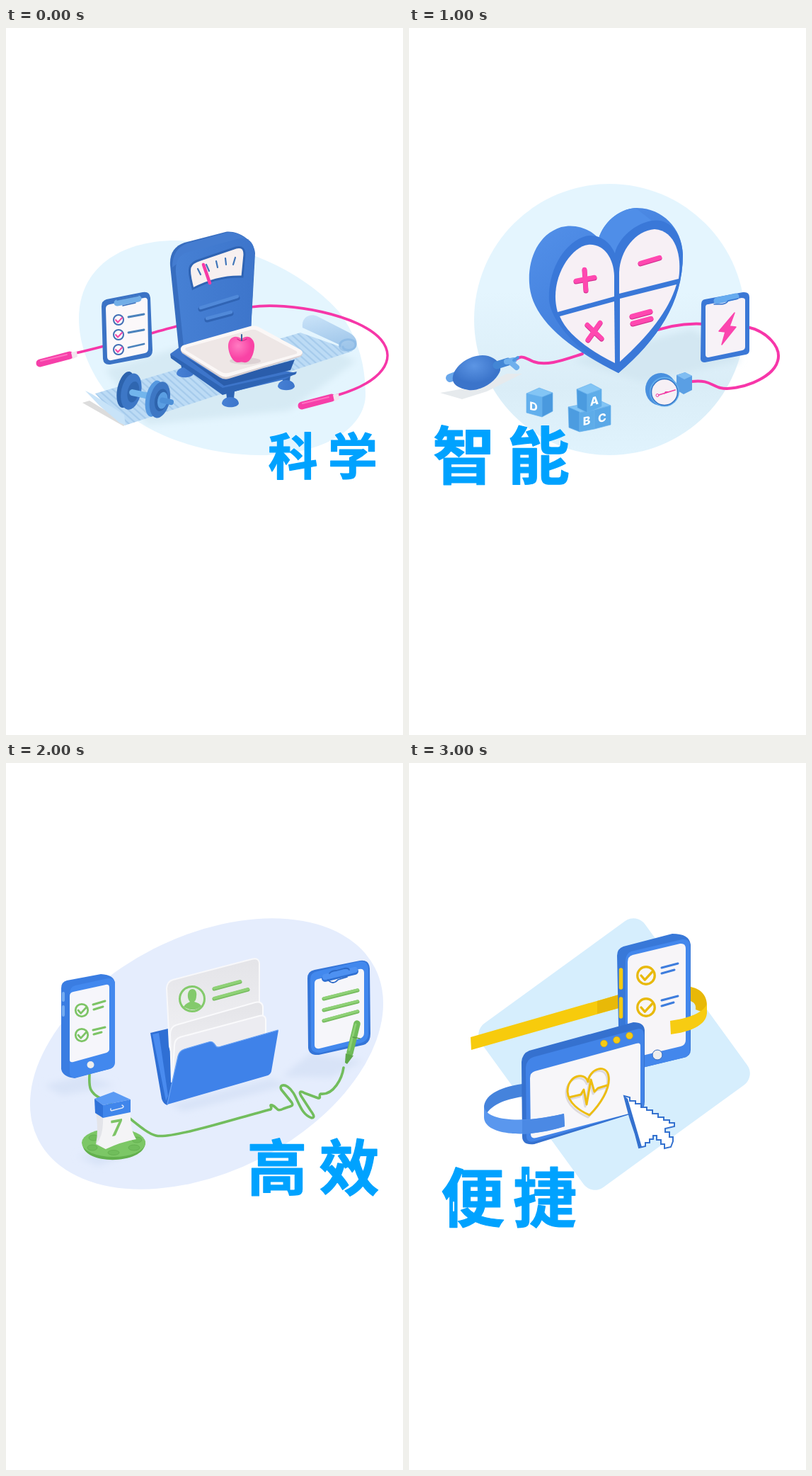
An HTML page for the animation above (4000 ms loop, 561 px wide and 998 px high).

```html
<!DOCTYPE html>
<html lang="zh-CN">
<head>
<meta charset="utf-8">
<title>科学 智能 高效 便捷</title>
<style>
html, body { margin: 0; width: 100%; height: 100%; overflow: hidden; background: #fff; }
svg { display: block; width: 100vw; height: 100vh; }
.scene { visibility: hidden; }
.line { fill: none; stroke-linecap: round; stroke-linejoin: round; }
.soft { filter: url(#blur); }
.word { font: 700 70px "Noto Sans CJK SC", "Noto Sans CJK", sans-serif; text-anchor: middle;
  fill: #00a2ff; stroke: #00a2ff; stroke-width: 1.2; stroke-linejoin: round; }
.glint { fill: none; stroke: #fff; stroke-width: 2; stroke-linecap: round; }
.abc { font: 800 16px Inter, "Open Sans", sans-serif; text-anchor: middle; fill: #fff; }
.ring { fill: none; stroke: var(--ring); stroke-width: var(--w, 2); }
.mark { fill: none; stroke: var(--mark); stroke-width: var(--w, 2); stroke-linecap: round; stroke-linejoin: round; }
</style>
</head>
<body>
<svg viewBox="0 0 561 998">
<defs>
  <filter id="blur" x="-30%" y="-60%" width="160%" height="220%"><feGaussianBlur stdDeviation="5"/></filter>
  <linearGradient id="blue"><stop stop-color="#4680d4"/><stop offset="1" stop-color="#3d75cb"/></linearGradient>
  <linearGradient id="side" x2=".7" y2="1"><stop stop-color="#5592ea"/><stop offset="1" stop-color="#3876d6"/></linearGradient>
  <linearGradient id="paper" x2="0" y2="1"><stop stop-color="#e4e4e8"/><stop offset="1" stop-color="#f4f4f7"/></linearGradient>
  <linearGradient id="floor" x2="0" y2="1"><stop offset=".4" stop-color="#e4f5fe"/><stop offset=".75" stop-color="#daedf7"/><stop offset="1" stop-color="#e0f3fd"/></linearGradient>
  <linearGradient id="roll" x2=".3" y2="1"><stop stop-color="#cbe4f9"/><stop offset="1" stop-color="#9fc6ea"/></linearGradient>
  <radialGradient id="apple" cx=".38" cy=".35"><stop stop-color="#ff7cc2"/><stop offset="1" stop-color="#f943a5"/></radialGradient>
  <radialGradient id="bulb" cx=".45" cy=".3"><stop stop-color="#5c95e4"/><stop offset="1" stop-color="#3b74ca"/></radialGradient>
  <pattern id="ribs" width="8" height="400" patternUnits="userSpaceOnUse" patternTransform="matrix(1 -.29 .9 .8 0 500)">
    <path d="M0 0H8V400H0Z" fill="#bcdbf5"/><path d="M0 0H2.500V400H0Z" fill="#a6cbec"/>
  </pattern>
  <g id="tick"><circle class="ring" r="7"/><path class="mark" d="M-4 0L-1 3.5L5 -3"/></g>
  <g id="foot"><path d="M-6 -14H6L5 -4H-5Z" fill="#2d64b4"/><path d="M-12 3C-11 -9 11 -9 12 3C10 10 -10 10 -12 3Z" fill="url(#blue)"/></g>
  <g id="handle"><path class="line" d="M0 0L42 -11" stroke="#f63fa9" stroke-width="11"/><path class="line" d="M1 -3L38 -12" stroke="#ff70c1" stroke-width="2"/><path d="M44 -15L52 -17L53 -9L46 -6Z" fill="#f2e6ee"/></g>
  <path id="pulse" class="line" stroke-width="3" d="M253 450C248 435 224 441 224 464C225 480 241 491 255 497C270 482 285 460 282 442C279 424 255 431 253 450M226 472L243 468L247 461L251 482L257 447L262 464L267 459L280 455"/>
</defs>

<g class="scene">
  <path d="M103 410C103 340 160 300 240 300C340 302 425 350 470 400C500 440 508 480 508 520C505 570 440 603 360 603C270 602 190 570 150 525C120 490 103 450 103 410Z" fill="#e4f5fe"/>
  <path class="soft" d="M140 482L240 452L430 440L495 470L400 540L200 560Z" fill="#d6eaf4"/>
  <path d="M108 529L118 526L170 558L166 562Z" fill="#dcdcdc"/>
  <path class="line" d="M98 459C150 447 200 432 245 420M345 394C400 386 500 405 530 440C553 468 532 500 466 519" stroke="#f637a8" stroke-width="3.600"/>
  <use href="#handle" x="48" y="473"/><use href="#handle" x="418" y="533"/>
  <path d="M126 516L416 430L490 456L168 561Z" fill="url(#ribs)"/>
  <path d="M112 512L122 517L167 546L169 561L160 557L132 533Z" fill="#c8e3f8"/>
  <path d="M419 423C417 408 430 402 440 407L485 430C498 437 499 450 488 455C478 459 468 455 471 447Z" fill="url(#roll)"/>
  <path class="line" d="M472 449C470 438 494 436 494 447C494 456 477 457 476 450" stroke="#8fbce6" stroke-width="3"/>

  <path d="M244 452L232 335C231 318 238 308 252 303L310 288C326 285 351 299 352 318L346 428L250 458Z" fill="#376dbf"/>
  <path d="M235 338C235 320 242 309 256 304L311 289C323 287 333 292 342 300L260 318Z" fill="#447cd0"/>
  <path d="M252 458L240 345C239 328 245 320 258 316L330 297C344 295 351 304 351 318L346 428Z" fill="url(#blue)"/>
  <path d="M264 368C261 355 258 345 260 338C262 332 268 329 275 327L325 310C334 308 337 312 337 320L334 351C311 350 287 356 264 368Z" fill="#f7f0f0" stroke="#2f64b4" stroke-width="3"/>
  <path class="line" d="M271 340L275 348M283 334L287 343M297 329L299 338M310 325L311 334M324 324L321 334" stroke="#4176b9" stroke-width="2.200"/>
  <path class="line" d="M279 334L288 360" stroke="#f63ba6" stroke-width="4.500"/>
  <path class="line" d="M275 397L327 381M284 412L318 403" stroke="#3064b4" stroke-width="7"/>
  <path class="line" d="M275 395L327 379M284 410L318 401" stroke="#5089d9" stroke-width="4.500"/>

  <use href="#foot" x="253" y="485"/><use href="#foot" x="317" y="527"/><use href="#foot" x="396" y="503"/>
  <path d="M232 460L246 450L310 470L411 487L394 496L306 517Z" fill="#3d75ca"/>
  <path d="M232 460L306 508L411 485L409 489L306 518L233 466Z" fill="#2e64b4"/>
  <path d="M250 462L306 496L408 468L402 483L308 505Z" fill="#2a5dab"/>
  <path d="M250 449L345 422Q351 420 357 423L416 455Q422 459 416 464L315 495Q308 497 302 493L249 459Q244 453 250 449Z" fill="#d9d1d3"/>
  <path d="M250 448L345 421Q351 419 357 422L416 454Q422 458 416 462L315 492Q308 494 302 490L249 457Q244 452 250 448Z" fill="#fbf7f6"/>
  <path d="M255 451L346 426Q351 425 355 427L410 456Q413 458 410 460L314 487Q309 488 305 486L254 455Q252 452 255 451Z" fill="#eee7e6"/>
  <ellipse cx="338" cy="470" rx="22" ry="5" fill="#ddd2d4"/>
  <path d="M333 439C342 431 352 439 351 450C350 463 344 474 336 472Q333 471 329 472C320 473 314 458 314 449C314 437 324 432 333 439Z" fill="url(#apple)"/>
  <path class="line" d="M327 439Q333 444 340 439" stroke="#d52e8b" stroke-width="1.500"/>
  <path class="line" d="M333 441V433" stroke="#365f9d" stroke-width="2"/>

  <path d="M142 383L193 373Q203 371 204 381L207 455Q207 463 200 465L147 475Q138 476 137 467L135 393Q135 385 142 383Z" fill="#3b73c5"/>
  <path d="M147 390L195 381Q199 380 200 384L201 452Q201 458 196 459L149 469Q143 470 143 464L141 396Q141 391 147 390Z" fill="#fbf8fa"/>
  <path class="line" d="M157 388L187 382" stroke="#72aee7" stroke-width="9"/>
  <path class="line" d="M157 384L187 378M165 392L183 388" stroke="#3a70be" stroke-width="1.500"/>
  <g style="--ring:#416fb5;--mark:#f349a8"><use href="#tick" x="159" y="412"/><use href="#tick" x="159" y="433"/><use href="#tick" x="159" y="454"/></g>
  <path class="line" d="M173 408L195 404M173 430L195 426M173 451L195 446" stroke="#4b83bd" stroke-width="2.800"/>

  <g transform="rotate(12 200 515)">
    <ellipse cx="169" cy="517" rx="12" ry="26" fill="#2d63ad"/><ellipse cx="177" cy="518" rx="14" ry="26" fill="#3d77c6"/>
    <ellipse cx="180" cy="518" rx="8" ry="15" fill="#2f66b0"/>
    <path class="line" d="M179 519H212" stroke="#72b5ec" stroke-width="9"/>
    <ellipse cx="211" cy="521" rx="12" ry="26" fill="#5598df"/><ellipse cx="219" cy="521" rx="14" ry="26" fill="#3d77c4"/>
    <ellipse cx="221" cy="521" rx="9" ry="16" fill="#2e64ad"/><ellipse cx="223" cy="521" rx="7" ry="12" fill="#5a9ee2"/>
    <path class="line" d="M223 521H235" stroke="#4d90d8" stroke-width="8"/>
  </g>
  <g class="word"><text x="405.500" y="631">科</text><text x="490" y="631">学</text></g>
</g>

<g class="scene">
  <circle cx="283.500" cy="411.500" r="191.500" fill="url(#floor)"/>
  <path class="soft" d="M230 470L400 425L470 470L330 500Z" fill="#d3e7f2"/>
  <path d="M44 515L105 504L138 488L160 488L110 513L75 524Z" fill="#e6eaed"/>
  <path class="line" d="M150 469C160 460 166 467 176 471C195 478 220 468 245 460M335 432C360 422 390 416 418 418M478 422C505 428 527 450 521 470C514 496 463 513 440 508C427 505 424 496 399 499" stroke="#f736a9" stroke-width="4"/>
  <path class="line" d="M58 494L66 491" stroke="#69a7eb" stroke-width="12"/>
  <path d="M62 492C65 475 90 458 112 463C126 467 132 478 128 486C121 501 100 513 84 511C68 508 60 502 62 492Z" fill="url(#bulb)"/>
  <path class="line" d="M124 476L140 471" stroke="#4386d5" stroke-width="11"/>
  <path class="line" d="M138 471L148 469M145 473L152 479" stroke="#70b0ed" stroke-width="8"/>
  <path class="line" d="M148 469L154 465" stroke="#5197e2" stroke-width="4"/>

  <path d="M268 297C255 283 235 276 215 281C180 292 168 330 170 360C172 400 205 442 296 487C350 440 387 390 387 320C386 280 355 253 320 254C295 256 275 275 268 297Z" fill="url(#side)"/>
  <path d="M268 297L292 320C295 303 315 277 343 272L320 254C295 256 275 275 268 297Z" fill="#4f8ee8"/>
  <path d="M291 318C282 297 262 289 246 295C213 308 196 350 198 385C201 412 234 456 296 487C352 440 387 385 387 320C385 285 365 268 343 272C313 278 294 302 291 318Z" fill="#3a78d8"/>
  <g fill="#f7f0f5">
    <path d="M290 379L210 401C197 356 228 309 253 306C275 304 289 324 290 350Z"/>
    <path d="M297 375L381 354C386 322 377 286 347 284C320 286 298 314 297 345Z"/>
    <path d="M213 407L290 386L291 473C255 455 224 433 213 407Z"/>
    <path d="M298 382L378 362C367 399 339 434 298 471Z"/>
  </g>
  <path class="line" d="M236 358L262 353M248 342L250 371M327 333L354 325M252 420L272 439M270 417L253 441M315 408L341 401M316 418L342 411" stroke="#d42f91" stroke-width="7"/>
  <path class="line" d="M236 357L262 352M248 341L250 370M327 332L354 324M252 419L272 438M270 416L253 440M315 407L341 400M316 417L342 410" stroke="#ff48b0" stroke-width="6.500"/>

  <path d="M418 383L472 373Q481 372 481 380V455Q481 460 476 461L418 472Q412 472 412 467L413 390Q413 384 418 383Z" fill="#3b78d6"/>
  <path d="M423 390L470 381Q475 381 475 384V450Q475 454 471 455L423 465Q419 465 419 461V394Q419 390 423 390Z" fill="#f7f2f7"/>
  <path class="line" d="M435 385L462 379" stroke="#66abef" stroke-width="9"/>
  <path class="line" d="M431 390H440Q448 390 451 385L465 382" stroke="#3976d0" stroke-width="1.500"/>
  <path d="M460 402L438 428L447 429L442 447L462 422L453 421Z" fill="#fb45ae" stroke="#fb45ae" stroke-width="1.500" stroke-linejoin="round"/>

  <path d="M378 490L390 486L400 491V511L388 517L378 511Z" fill="#5a9fe4"/><path d="M378 490L390 486L400 491L389 496Z" fill="#80bdf2"/>
  <ellipse cx="356" cy="510" rx="22" ry="23" fill="#4990df"/>
  <circle cx="361" cy="513.500" r="21" fill="#63acea"/><circle cx="361" cy="514" r="18.500" fill="#f6f0f5" stroke="#3574c6" stroke-width="1.500"/>
  <path class="line" d="M353 518L376 511" stroke="#f13ca5" stroke-width="1.800"/><path d="M360 517L362 513L369 513Z" fill="#f13ca5"/><circle cx="351" cy="518.500" r="2" fill="none" stroke="#f13ca5"/>

  <g stroke="#69b2ec" stroke-width=".7">
    <path d="M166 516L184 508L203 515L184 523Z" fill="#83c5f5"/><path d="M166 516L188 521V549L166 543Z" fill="#63b0ed"/><path d="M188 521L203 515V541L188 549Z" fill="#4a99de"/>
    <path d="M225 535L270 526L285 533L241 543Z" fill="#83c5f5"/><path d="M225 535L241 542V570L226 564Z" fill="#4c9ce0"/><path d="M241 543L262 539V566L241 570Z" fill="#5eace9"/><path d="M262 539L285 533V560L262 566Z" fill="#5aa8e7"/>
    <path d="M237 510L257 502L272 510L252 517Z" fill="#83c5f5"/><path d="M237 510L252 517V543L238 536Z" fill="#4b9bdf"/><path d="M252 517L272 510V534L252 543Z" fill="#5fade9"/>
  </g>
  <g class="abc"><text transform="translate(176 540) skewY(12)">D</text><text transform="translate(262 532) skewY(-15)">A</text><text transform="translate(251 560) skewY(-12)">B</text><text transform="translate(273 556) skewY(-12)">C</text></g>
  <g class="word" style="font-size:88px"><text x="77.500" y="636">智</text><text x="183" y="636">能</text></g>
</g>

<g class="scene">
  <ellipse cx="283.500" cy="410.500" rx="267" ry="166" transform="rotate(-27 283.500 410.500)" fill="#e5edfd"/>
  <g class="soft" fill="#d8e3f7"><path d="M54 455L110 440L154 455L80 469Z"/><path d="M232 482L375 445L398 455L250 492Z"/><path d="M390 443L430 410L505 420L460 444Z"/><path d="M100 554L190 546L130 569Z"/></g>
  <g class="line">
    <path d="M118 440C117 458 118 466 135 474C165 488 193 522 212 526C235 531 330 500 374 489C377 486 371 482 376 483C384 486 382 493 392 488C402 484 409 485 402 477L389 461C386 455 392 453 398 457C413 467 413 495 432 501C438 501 433 494 430 490L417 470C413 463 417 463 422 466L441 473C446 474 441 468 445 467C463 469 475 445 477 430" stroke="#72bd5d" stroke-width="3.600"/>
  </g>

  <path d="M78 318Q78 309 86 307L134 298Q154 299 154 312V422Q153 430 146 432L97 445Q80 443 78 432Z" fill="#3a7de2"/>
  <path d="M90 326Q90 316 98 314L144 304Q154 303 154 312V422Q154 430 146 432L98 444Q90 445 90 437Z" fill="#4288ee"/>
  <path d="M90 329Q90 324 95 323L141 313Q146 312 146 317V404Q146 407 142 409L95 422Q90 423 90 419Z" fill="#f6f6fb"/>
  <circle cx="119.500" cy="426" r="5" fill="#eee"/>
  <path class="line" d="M81 325V335M81 344V356" stroke="#75acf1" stroke-width="4"/>
  <g style="--ring:#7dc466;--mark:#7dc466;--w:2.200"><use href="#tick" transform="translate(107 349) scale(1.250)"/><use href="#tick" transform="translate(107 384) scale(1.250)"/></g>
  <path class="line" d="M123 341L140 336M124 348L137 344M123 377L140 373M124 383L135 380" stroke="#7dc466" stroke-width="3"/>

  <path d="M108 537C108 517 196 515 197 536C196 567 108 569 108 537Z" fill="#62b04d"/>
  <ellipse cx="152" cy="536" rx="45" ry="20" fill="#7cc766"/>
  <g fill="#70bd5b" stroke="#62ae4e" stroke-width=".8"><ellipse cx="124" cy="529" rx="7" ry="4"/><ellipse cx="122" cy="543" rx="7" ry="4"/><ellipse cx="152" cy="550" rx="8" ry="3.500"/><ellipse cx="181" cy="543" rx="8" ry="4"/><ellipse cx="185" cy="532" rx="7" ry="4"/></g>
  <path d="M127 492L138 500L141 545L127 538Q131 520 127 492Z" fill="#e3e4e9"/>
  <path d="M137 500L176 492Q175 518 184 531Q162 535 141 545Q133 541 128 537Q138 526 137 500Z" fill="#f4f4f6"/>
  <path d="M125 474L152 464L176 475L137 483Z" fill="#5a9af4"/><path d="M125 474L137 483V501L126 494Z" fill="#2f72d9"/><path d="M137 483L176 475V493L137 501Z" fill="#4086eb"/>
  <path class="line" d="M148 488Q147 492 152 490L164 487Q168 485 164 483" stroke="#dce7f8" stroke-width="1.500"/>
  <text transform="translate(156 526) skewY(-10)" style="font:800 31px Lato,sans-serif" text-anchor="middle" fill="#7dc466">7</text>

  <path d="M204 381L229 375L236 450L228 483Q222 481 220 474Z" fill="#2f6fd4"/>
  <path d="M207 383L216 381L229 470L226 477Z" fill="#498bef"/>
  <path d="M231 400L227 318Q228 308 236 306L347 277Q358 274 358 284V390L240 430Z" fill="url(#paper)" stroke="#f8f8fa" stroke-width="2"/>
  <circle cx="263" cy="333" r="17.500" fill="#e9ece9" stroke="#84ca6c" stroke-width="3"/>
  <path d="M263 319C268 319 270 324 269 329Q269 334 266 337Q274 339 276 343Q266 353 251 344Q253 340 260 337C255 332 256 320 263 319Z" fill="#84ca6c"/>
  <path class="line" d="M294 319L331 309M294 333L342 320" stroke="#75bb5e" stroke-width="5"/><path class="line" d="M294 318L331 308M294 332L342 319" stroke="#8fd177" stroke-width="4"/>
  <path d="M234 450L232 383Q232 373 240 370L352 338Q362 336 363 344V395L240 450Z" fill="url(#paper)" stroke="#fafafc" stroke-width="2"/>
  <path d="M235 455L238 399Q238 390 246 387L358 357Q367 355 367 363V400L245 450Z" fill="#ececf1" stroke="#fafafc" stroke-width="2"/>
  <path d="M228 482L243 414Q245 406 252 404L286 394Q291 392 294 396L297 400Q299 402 304 400L385 377L375 435Q374 439 370 441Z" fill="#3f82e9"/>
  <path class="line" d="M228 481L243 414Q245 406 252 404L286 394Q291 392 294 396L297 400Q299 402 304 400L384 377" stroke="#65a0f5" stroke-width="1.300"/>

  <path d="M436 292L500 279Q513 277 514 290L515 382Q515 395 505 398L442 412Q428 413 427 402L426 304Q426 294 436 292Z" fill="#3475d8"/>
  <path d="M440 294L500 280Q511 279 512 290V382Q512 392 502 395L445 409Q432 410 431 401L430 305Q430 296 440 294Z" fill="#4288ed"/>
  <path d="M441 305L499 291Q506 290 506 296V381Q506 387 500 389L443 403Q436 404 436 398V311Q436 306 441 305Z" fill="#f6f6fa"/>
  <path class="line" d="M451 304L493 294" stroke="#2f70d2" stroke-width="10"/><path class="line" d="M451 302L493 292" stroke="#4e91f1" stroke-width="8"/><path class="line" d="M457 297Q460 293 467 293L478 290Q484 289 485 292M455 306Q462 314 469 306L482 302" stroke="#2b68c6" stroke-width="1.800"/>
  <path class="line" d="M449 333L497 321M449 349L497 337M449 364L497 351" stroke="#75bb5e" stroke-width="5"/><path class="line" d="M449 332L497 320M449 348L497 336M449 363L497 350" stroke="#8fd177" stroke-width="3.500"/>
  <path class="line" d="M496 368L486 409" stroke="#70bc5a" stroke-width="9.500"/><path class="line" d="M494 369L485 405" stroke="#8bd073" stroke-width="3"/>
  <path d="M480 410L491 413L482 425L479 423Z" fill="#5fa84b"/><path class="line" d="M490 387L500 389" stroke="#589e45" stroke-width="1.500"/>
  <g class="word" style="font-size:85px"><text x="383" y="603">高</text><text x="485" y="603">效</text></g>
</g>

<g class="scene">
  <rect x="147" y="268" width="286" height="286" rx="20" transform="rotate(-36 290 411)" fill="#d6eefd"/>
  <path d="M87 387L300 326V345L88 405Z" fill="#f7cb0c"/><path d="M266 336L300 326V345L266 354Z" fill="#e8b908"/>
  <path d="M294 272Q294 262 303 259L372 241Q397 241 398 257V405Q398 414 388 416L330 430L297 420Z" fill="#3878d8"/>
  <path d="M306 280Q306 269 314 266L386 249Q397 248 397 258V405Q397 414 388 416L330 430L306 420Z" fill="#4387ec"/>
  <path d="M309 281Q309 273 316 271L383 255Q391 254 391 262V391Q391 398 384 400L309 418Z" fill="#f7f5f8"/>
  <circle cx="351" cy="412" r="7" fill="#eee" stroke="#3068bf"/>
  <path class="line" d="M299.500 292V317M299.500 333V358" stroke="#f4ca12" stroke-width="5.500"/>
  <g style="--ring:#e8b90b;--mark:#e8b90b;--w:1.900"><use href="#tick" transform="translate(335 300) scale(1.750)"/><use href="#tick" transform="translate(335 345) scale(1.750)"/></g>
  <path class="line" d="M357 289L380 283M357 297L375 292M357 335L380 329M357 343L374 338" stroke="#3e7ddd" stroke-width="3"/>
  <path d="M398 316C414 319 422 330 421 345V354L405 348C406 340 402 338 398 336Z" fill="#e8b807"/>
  <path d="M421 338C420 352 392 361 369 364L370 383C395 380 421 371 421 352Z" fill="#f7cc12"/>

  <path d="M160 453C125 458 106 470 106 487V501C115 482 135 475 160 471Z" fill="#4583dc"/>
  <path d="M159 422Q160 410 170 406L317 366Q332 366 333 377V478Q333 489 325 492L177 538Q160 540 160 527Z" fill="#3571cf"/>
  <path d="M165 430Q166 418 176 415L321 376Q332 373 332 384V478Q332 488 324 491L178 534Q167 537 166 528Z" fill="#4284e8"/>
  <path d="M171 445Q171 437 178 435L321 396Q327 394 327 399V486Q327 491 322 492L180 529Q172 531 172 524Z" fill="#f7f6f9"/>
  <g fill="#f5cb15" stroke="#d7a90c" stroke-width=".8"><circle cx="275.500" cy="396" r="4.800"/><circle cx="293.500" cy="391" r="4.800"/><circle cx="311.500" cy="385" r="4.800"/></g>
  <use href="#pulse" x="-2" y="3" stroke="#ddd9dc"/><use href="#pulse" stroke="#edbd10"/>
  <path d="M106 485C110 507 165 508 219 495L220 513C165 531 106 525 106 500Z" fill="#5a97ee"/><path d="M160 504Q190 502 219 495L220 513Q190 522 160 524Z" fill="#4b89e4"/>

  <path d="M304 470L312 472V477H320V481H328V486H336V490H344V495H352V500H360V504H368V508H375V513L362 516V521H368V528H373V534L370 542L361 544V538H356V532H350V526H345V531H340V536H334V541L325 543L320 524L312 500Z" fill="#fff" stroke="#3471cf" stroke-width="2"/>
  <path d="M304 470L325 543L329 542L309 474Z" fill="#3471cf"/>
  <g class="word" style="font-size:90px"><text x="90" y="647">便</text><text x="192" y="647">捷</text></g>
  <path class="glint" d="M63 620V632M166 582V590"/>
</g>
</svg>
<script>
const scenes = document.querySelectorAll(".scene");
const start = performance.now();

function draw() {
  const now = Math.floor((performance.now() - start) / 1000) % scenes.length;
  scenes.forEach((scene, i) => scene.style.visibility = i === now ? "visible" : "hidden");
  requestAnimationFrame(draw);
}
draw();
</script>
</body>
</html>
```
